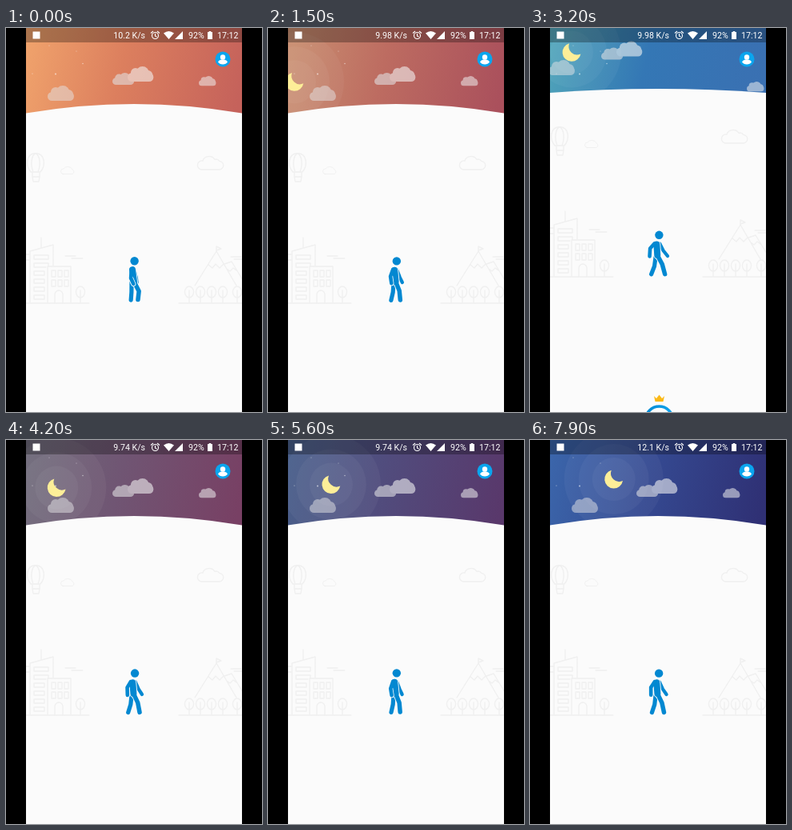
These frames come from a looping animation (320x480 px, 8 s). An HTML page:

```html
<!DOCTYPE html>
<html lang="en">
<head>
<meta charset="utf-8">
<title>Walking under a changing sky</title>
<style>
html, body { margin: 0; width: 100%; height: 100%; overflow: hidden; background: #000; }
svg { display: block; width: 320px; height: 480px; }
text { font: 10.6px Roboto, Arial, sans-serif; fill: #fff; }
.lines { fill: none; stroke: #f0f0f0; stroke-width: 1.4; stroke-linecap: round; stroke-linejoin: round; }
#walker { stroke-linecap: round; stroke-linejoin: round; fill: none; }
</style>
</head>
<body>
<svg viewBox="0 0 320 480">
  <defs>
    <linearGradient id="sky" gradientUnits="userSpaceOnUse" x1="25" y1="10" x2="295" y2="70">
      <stop/><stop offset=".45"/><stop offset="1"/>
    </linearGradient>
    <linearGradient id="ringFill"><stop stop-color="#0288d1"/><stop offset="1" stop-color="#12a5ee"/></linearGradient>
    <g id="puff">
      <rect y="8" width="33" height="11" rx="5.5"/>
      <circle cx="10" cy="8" r="6"/><circle cx="19" cy="8.500" r="8.500"/><circle cx="26" cy="11" r="6"/>
    </g>
    <g id="tree"><ellipse cy="330" rx="5.5" ry="7"/><path d="M0 328V344"/></g>
  </defs>

  <rect x="25" width="270" height="120" fill="url(#sky)"/>
  <g fill="#fff" fill-opacity=".65">
    <circle cx="62" cy="57.500" r=".9"/><circle cx="33" cy="57" r=".6"/>
    <circle cx="96" cy="44.500" r=".7"/><circle cx="54" cy="22" r=".5"/><circle cx="88" cy="29" r=".5"/>
  </g>
  <g id="moon">
    <g fill="#fff" fill-opacity=".04"><circle r="62"/><circle r="44"/><circle r="27"/></g>
    <path d="M-3 -11.200A11.500 11.500 0 1 0 11.300 2A10.500 10.500 0 0 1 -3 -11.200Z" fill="#fdee98"/>
  </g>
  <g id="cloudL" opacity=".5" fill="#e4e4e6"><use href="#puff"/></g>
  <g id="cloudM" opacity=".58">
    <use href="#puff" transform="translate(133 56) scale(.82 .79)" fill="#e2e2e4"/>
    <use href="#puff" transform="translate(152 48) scale(.98 1)" fill="#f4f4f4"/>
  </g>
  <g id="cloudR" opacity=".54" fill="#f0f0f0"><use href="#puff" transform="scale(.65)"/></g>
  <path id="page" fill="#fbfbfb"/>

  <g id="content">
    <g class="lines">
      <path d="M31 180C24 172 25 157 37 156.500C49 157 50 172 43 180ZM34 180C30 170 32 159 37 156.500C42 159 44 170 40 180M33 186H42L41 192H34ZM33 180V186M42 180V186"/>
      <path d="M71 182.500H83A3 3 0 0 0 83 177A6 5 0 0 0 72 176A3.300 3.300 0 0 0 71 182.500Z" stroke-width=".9"/>
      <path d="M244 177H266A5 5 0 0 0 267 166.500Q264 163 261 164.500A8 7 0 0 0 246 166A5.500 5.500 0 0 0 244 177Z"/>
      <path d="M25 344H104M30 344V279L59 271V298M44 274V262M25 283H30M25 290H30M52 344V298H81V344"/>
      <path d="M35 284H53V289H35ZM35 294H53V298M35 294V299H50M35 304H48V309H35ZM35 314H48V319H35ZM35 324H48V329H35ZM35 334H48V339H35Z"/>
      <path d="M57 303H62V311H57ZM65 303H70V311H65ZM73 303H78V311H73ZM57 315H62V323H57ZM65 315H70V323H65ZM73 315H78V323H73ZM61 344V333A5 5 0 0 1 71 333V344"/>
      <path d="M74 285H87M82 288H96M281 286H294M285 289H295"/>
      <path d="M216 344H295M236 322L263 279L288 322M273 295L282 292L296 315M253 296L258 300L262 295L267 300L272 295M263 279V273L269 276L263 278M276 301L280 304L284 300L288 303"/>
      <use href="#tree" x="93"/><use href="#tree" x="229"/><use href="#tree" x="243"/>
      <use href="#tree" x="257"/><use href="#tree" x="271"/><use href="#tree" x="289"/>
    </g>
    <g id="walker"><circle id="head" r="5.2" fill="#0288d1"/></g>
    <path d="M155 493L158 496L161.500 491.500L165 496L168 493L166.500 500H156.500Z" fill="#fbb917"/>
    <circle cx="161.500" cy="523" r="17" fill="none" stroke="url(#ringFill)" stroke-width="3.5"/>
  </g>

  <circle cx="271" cy="39" r="9.500" fill="#0aa5ee"/>
  <circle cx="271" cy="36.500" r="3.200" fill="#fff"/>
  <path d="M265 42.500Q265.500 40.500 269 39.500H273Q276.500 40.500 277 42.500Q275 45.500 271 45.500Q267 45.500 265 42.500Z" fill="#fff"/>

  <rect x="25" width="270" height="18" fill="#000" fill-opacity=".29"/>
  <rect x="33.500" y="4.500" width="9" height="9" fill="#fff"/>
  <text id="speed" x="174" y="13" text-anchor="end"></text>
  <g fill="none" stroke="#fff" stroke-width="1.1">
    <circle cx="186.500" cy="9.500" r="4"/>
    <path d="M186.500 7V10L188.500 11M181 6.500L184 4M192 6.500L189 4"/>
  </g>
  <path d="M197 6.500Q203.500 1.500 210 6.500L203.500 14ZM211 14L221 4V14ZM252 5H253.700V4H256.300V5H258V14H252Z" fill="#fff"/>
  <text x="228" y="13">92%</text>
  <text x="264" y="13">17:12</text>

  <path d="M0 0H25V480H0ZM295 0H320V480H295Z"/>
</svg>
<script>
const LOOP = 8000, STEP = 585, BLUE = '#0288d1', PAPER = '#fbfbfb';
const $ = q => document.querySelector(q);
const set = (el, attrs) => { for (const k in attrs) el.setAttribute(k, attrs[k]); };
const lerp = (a, b, p) => a + (b - a) * p;
const mix = (a, b, p) => a.map((v, i) => Array.isArray(v) ? mix(v, b[i], p) : lerp(v, b[i], p));
const smooth = (t, a, b) => { const p = Math.min(1, Math.max(0, (t - a) / (b - a))); return p * p * (3 - 2 * p); };
const rgb = hex => [1, 3, 5].map(i => parseInt(hex.slice(i, i + 2), 16));
const sky = (...c) => c.map(rgb);

// Interpolates [position, value] pairs
function track(keys, x) {
  let i = 0;
  while (i < keys.length - 2 && x > keys[i + 1][0]) i++;
  const [x0, a] = keys[i], [x1, b] = keys[i + 1];
  const p = Math.min(1, (x - x0) / (x1 - x0));
  return Array.isArray(a) ? mix(a, b, p) : lerp(a, b, p);
}

const skies = [
  [0, sky('#f0a36c', '#dc7f5e', '#c5625b')],
  [1500, sky('#c98f70', '#bd6c61', '#aa505c')],
  [2300, sky('#b07c6e', '#a86465', '#984e5d')],
  [4900, sky('#55647f', '#5c5078', '#6c3b67')],
  [6300, sky('#3d5c96', '#454882', '#46356e')],
  [7900, sky('#3b66ab', '#354a92', '#2f3074')]
];
const scrolledSky = sky('#48a0b6', '#3477b5', '#3a70b2');
const stride = [[0, .05], [.32, 1], [.38, 1], [.48, .72], [.565, .4], [.77, 0], [.93, .05], [1, .05]];
const speeds = ['10.2', '9.98', '9.74', '12.1'];

// Joints with the legs together and fully apart
const limbs = {
  armL: [[[157, 301], [156.5, 313], [160, 320]], [[155, 303], [148, 307], [146, 318]]],
  armR: [[[160, 302], [162.5, 312], [163, 318]], [[163, 303], [168, 311], [175, 318]]],
  torso: [[[158, 302], [160, 317]], [[158.5, 304], [159, 317]]],
  legL: [[[157, 318], [157, 330], [156.5, 340]], [[157, 320], [155, 331], [150, 341]]],
  legR: [[[160, 317], [163, 329], [161.5, 339.5]], [[159.5, 318], [166, 328], [171, 341]]]
};
const line = pts => 'M' + pts.map(p => p.join(' ')).join('L');

// Layers from back to front; paper-coloured ones cut gaps between the parts
const layers = [
  ['armR', 4.3, BLUE], ['legL', 5.2, BLUE],
  ['legR', 7.2, PAPER], ['torso', 9.8, PAPER],
  ['legR', 5.5, BLUE], ['torso', 8, BLUE],
  ['handL', 6.2, PAPER], ['armL', 4.6, BLUE]
].map(([part, width, stroke]) => {
  const el = document.createElementNS('http://www.w3.org/2000/svg', 'path');
  set(el, { stroke, 'stroke-width': width });
  $('#walker').append(el);
  return [part, el];
});
const move = (id, x, y) => set($(id), { transform: `translate(${x} ${y})` });

function walk(t) {
  const u = t / STEP % 1, s = track(stride, u);
  const pose = {};
  for (const k in limbs) pose[k] = mix(...limbs[k], s);
  const bend = u > .88 || u < .1 ? 1 : 0;
  pose.legR[1][0] += 3 * bend;
  pose.legR[2][0] += 3 * bend;
  pose.handL = pose.armL.slice(1);
  for (const [part, el] of layers) set(el, { d: line(pose[part]) });
  set($('#head'), { cx: lerp(160.6, 162, s * s), cy: lerp(291.2, 292.3, s * s) });
}

function draw(t) {
  const p = smooth(t, 2700, 3200) - smooth(t, 3600, 4200);
  const colors = mix(track(skies, t), scrolledSky, p);
  document.querySelectorAll('#sky stop').forEach((el, i) =>
    set(el, { 'stop-color': `rgb(${colors[i].map(Math.round)})` }));

  const sec = t / 1000 - 2.3;
  move('#moon', 42 + 11.2 * sec, 65 - 2.85 * sec - 32 * p);
  set($('#moon'), { opacity: smooth(t, 0, 800) });
  move('#cloudL', 52 - 29 * p, 72 - 32 * p);
  move('#cloudM', -44 * p, -31.5 * p);
  move('#cloudR', 241 + 30 * p, 60 + 7 * p);

  const edge = lerp(106.5, 81, p), top = lerp(83.5, 71, p);
  set($('#page'), { d: `M25 ${edge}Q160 ${top} 295 ${edge}V480H25Z` });
  move('#content', 0, -33 * p);
  walk(t);
  $('#speed').textContent = speeds[Math.floor((t + 2000) / 3000)] + ' K/s';
}

const start = performance.now();
function tick() {
  draw(Math.floor((performance.now() - start) % LOOP / 100) * 100);
  requestAnimationFrame(tick);
}
tick();
</script>
</body>
</html>
```
